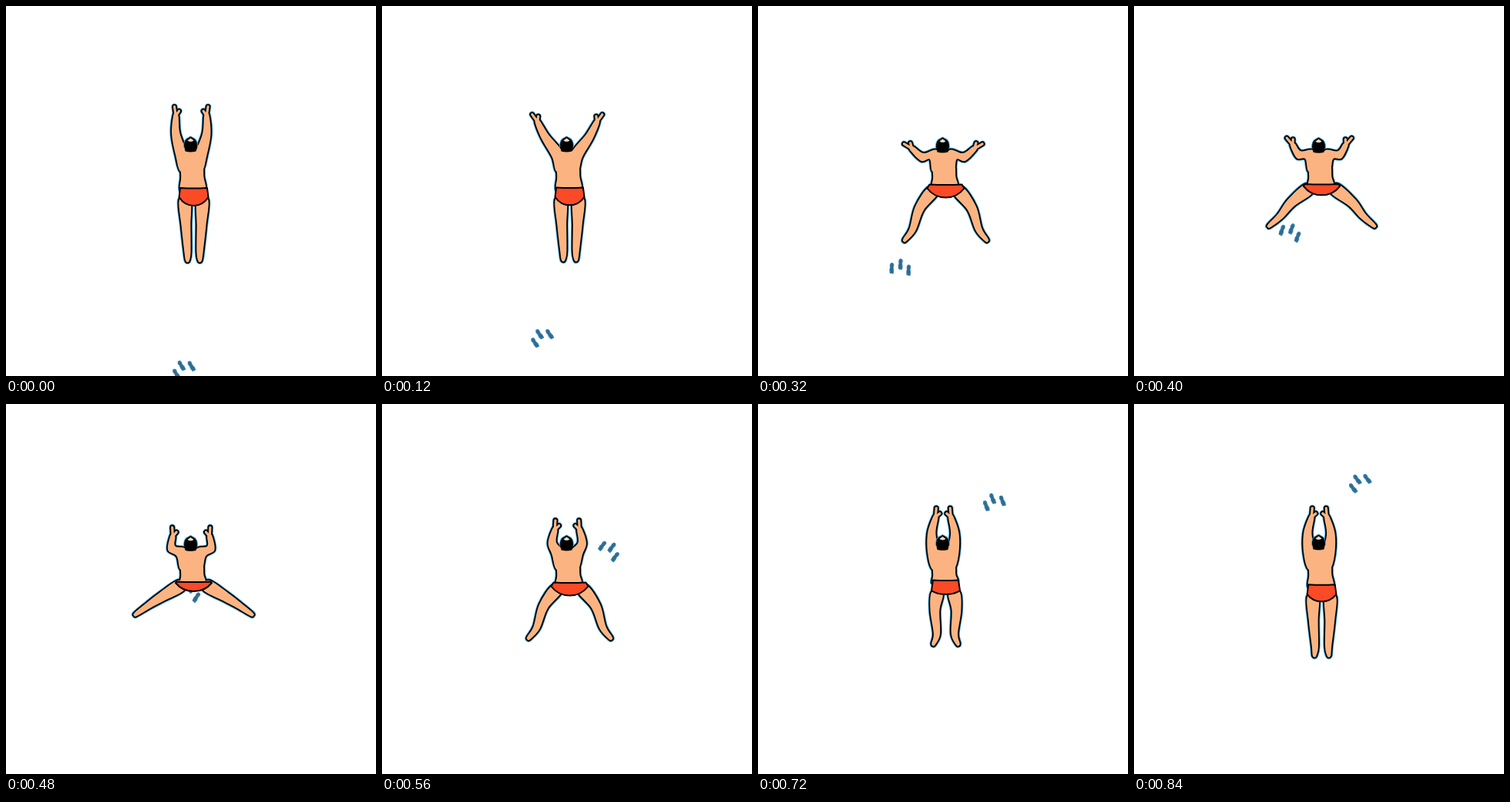
Animation, 480 px wide and 480 px high, one loop 0.88 s. Source, as an HTML page:

```html
<!DOCTYPE html>
<html lang="en">
<head>
<meta charset="utf-8">
<title>Swimmer</title>
<style>
  html, body { margin: 0; width: 100%; height: 100%; overflow: hidden; background: #fff; }
  svg { display: block; width: 100%; height: 100%; }
  path { stroke-linecap: round; stroke-linejoin: round; }
  .halo { fill: none; stroke: #3ba3e0; }
  .ink { fill: #000; stroke: #000; }
  .skin { fill: #fbb481; }
  .fingers { fill: none; }
  .fingers.skin { stroke: #fbb481; }
</style>
</head>
<body>
<svg viewBox="0 0 480 480">
  <g id="drops"></g>
  <path id="halo" class="halo" stroke-width="5.4"/>
  <path id="handHalo" class="halo" stroke-width="8.4"/>
  <path id="ink" class="ink" stroke-width="3.6"/>
  <path id="handInk" class="ink fingers" stroke-width="6.8"/>
  <path id="skin" class="skin"/>
  <path id="handSkin" class="skin fingers" stroke-width="3.2"/>
  <path id="trunks" fill="#fb4a26" stroke="#000" stroke-width="2"/>
  <g id="head">
    <path class="halo" stroke-width="2" d="M231 182Q231 173 236 171L239.500 169L243 171Q248 173 248 182"/>
    <path d="M231 181Q231 173 236 171L239.500 169L243 171Q248 173 248 181L246.500 188Q239.500 190 232.500 188Z"/>
    <path fill="#fbd9b4" d="M235.500 174L239.500 171L243.500 174Q239.500 177 235.500 174Z"/>
  </g>
</svg>
<script>
const LOOP = 880, SLOT = 40;
const HELD = [5, 9, 11, 17];      // slots that keep the previous picture
const CHEST = 240.3, PELVIS = 243.5;  // mirror axes of arms and legs

// time, elbow out and y, wrist out and y, kick
const STROKE = [
  [0, 20, 166, 20, 142.5, 0],
  [120, 28.5, 170, 38.5, 150.5, 0.05],
  [320, 27, 196, 40.5, 185, 2],
  [480, 25.5, 187, 24, 172, 3],
  [560, 19.5, 180, 16, 163, 2],
  [720, 15, 168, 10, 147, 1],
  [840, 15, 168, 10, 147, 0.2]
];
// kick, knee out and y, ankle out and y, trunks: top y, half, side y, half, bottom y
const KICK = [
  [0, 10, 285, 8, 319, 236, 17.5, 248, 19, 259],
  [1, 14, 268, 11.5, 298, 228.5, 16.5, 242, 18.5, 247],
  [2, 34, 262.5, 43, 290, 231.5, 21, 236.5, 24, 248.5],
  [3, 42, 250.5, 59, 261.5, 230.5, 22, 232, 23.5, 243]
];
// time, x, y, lean of the three drops
const DRIFT = [
  [0, 230, 471, -30], [120, 207, 430, -33], [320, 184.5, 340, 4], [480, 239, 243, 34],
  [560, 295, 190, 38], [720, 306, 127.5, -20], [840, 292.5, 102, -36]
];

const $ = id => document.getElementById(id);
const put = (id, d) => $(id).setAttribute("d", d);
const f = n => n.toFixed(2);

// smooth curve through rows [position, ...values], never passing the values
function sample(rows, pos) {
  const last = rows.length - 1;
  if (pos >= rows[last][0]) return rows[last].slice(1);
  let i = 0;
  while (pos >= rows[i + 1][0]) i++;
  const h = rows[i + 1][0] - rows[i][0], u = (pos - rows[i][0]) / h, v = 1 - u;
  return rows[i].slice(1).map((a, n) => {
    const k = n + 1;
    const rate = j => (rows[j + 1][k] - rows[j][k]) / (rows[j + 1][0] - rows[j][0]);
    const slope = j => {
      const p = rate(Math.max(0, j - 1)), q = rate(Math.min(last - 1, j));
      return p * q <= 0 ? 0 : 2 * p * q / (p + q);
    };
    return a * v * v * (1 + 2 * u) + rows[i + 1][k] * u * u * (3 - 2 * u)
      + h * u * v * (slope(i) * v - slope(i + 1) * u);
  });
}

function smooth(p) {
  const n = p.length, at = i => p[(i + n) % n];
  let d = "M" + p[0].map(f);
  for (let i = 0; i < n; i++) {
    const a = at(i - 1), b = at(i), c = at(i + 1), e = at(i + 2);
    d += "C" + [b[0] + (c[0] - a[0]) / 6, b[1] + (c[1] - a[1]) / 6,
      c[0] - (e[0] - b[0]) / 6, c[1] - (e[1] - b[1]) / 6, c[0], c[1]].map(f);
  }
  return d + "Z";
}

// rounded shape along a spine with a half width at each point
function limb(spine, widths, cap) {
  const one = [], two = [], end = spine.length - 1;
  let dx, dy;
  spine.forEach(([x, y], i) => {
    const a = spine[Math.max(0, i - 1)], b = spine[Math.min(end, i + 1)];
    const len = Math.hypot(b[0] - a[0], b[1] - a[1]);
    dx = (b[0] - a[0]) / len;
    dy = (b[1] - a[1]) / len;
    one.push([x - dy * widths[i], y + dx * widths[i]]);
    two.unshift([x + dy * widths[i], y - dx * widths[i]]);
  });
  const [x, y] = spine[end];
  return smooth([...one, [x + dx * cap, y + dy * cap], ...two]);
}

const reach = ([x, y], angle, len) => [x + len * Math.sin(angle), y - len * Math.cos(angle)];

function drawBody(t) {
  const [ex, ey, wx, wy, kick] = sample(STROKE, t);
  const [kx, ky, ax, ay, top, topHalf, low, lowHalf, bottom] = sample(KICK, kick);

  // outward distances from the mirror axis
  const wrist = [wx, wy], bend = Math.atan2(wx - ex, ey - wy);
  const arm = [[7, 213], [12.5, 193], [ex, ey], wrist];
  const hand = [reach(wrist, bend + 0.15, 12), wrist, reach(wrist, bend - 0.6, 7.5)];
  const toe = reach([ax, ay], Math.PI - kick * 0.32, 11 + 3 * kick);
  const leg = [[lowHalf - 7.5, low + 3], [kx, ky], [ax, ay], toe];

  let body = limb([[240, 190], [241.3, 208], [241.8, 222], [242.5, top + 3]], [11, 14.4, 14.6, 16], 0);
  let hands = "";
  for (const side of [-1, 1]) {
    const place = (points, axis) => points.map(([x, y]) => [axis + side * x, y]);
    body += limb(place(arm, CHEST), [7, 7.6, 5.2, 3.2], 3);
    body += limb(place(leg, PELVIS), [7.2, 5.9, 4.1, 2.4], 2.4);
    hands += "M" + place(hand, CHEST).map(p => p.map(f)).join("L");
  }
  ["halo", "ink", "skin"].forEach(id => put(id, body));
  ["handHalo", "handInk", "handSkin"].forEach(id => put(id, hands));

  const x = out => f(PELVIS + out), dip = f(low + (bottom - low) * 4 / 3);
  put("trunks", `M${x(-topHalf)},${f(top)}Q${PELVIS},${f(top + 1)} ${x(topHalf)},${f(top)}`
    + `L${x(lowHalf)},${f(low)}C${x(lowHalf / 2)},${dip} ${x(-lowHalf / 2)},${dip} ${x(-lowHalf)},${f(low)}Z`);
  $("head").setAttribute("transform", `translate(0 ${f(0.5 + kick / 2)})`);
}

// each drop sits in a fixed cluster that turns with its lean
$("drops").innerHTML = [[-11, 1], [0, -5], [11, 2]].map(([x, y]) =>
  `<path transform="translate(${x} ${y})" fill="#3d6580" stroke="#2a7fb2" stroke-width="1.4"
    d="M-1 -6.500Q2 -7 2 -4L1.500 -1L2.400 3L2 6.500L-1.600 6L-2.200 2L-1.600 -1L-2.200 -4Z"/>`).join("");

function drawDrops(t) {
  const [x, y, lean] = sample(DRIFT, t);
  $("drops").setAttribute("transform", `translate(${f(x)} ${f(y)}) rotate(${f(lean)})`);
}

let shown = -1;
function frame(now) {
  let slot = Math.floor(now % LOOP / SLOT);
  if (HELD.includes(slot)) slot--;
  if (slot !== shown) {
    shown = slot;
    drawBody(slot * SLOT);
    drawDrops(slot * SLOT);
  }
  requestAnimationFrame(frame);
}
frame(0);
</script>
</body>
</html>
```
